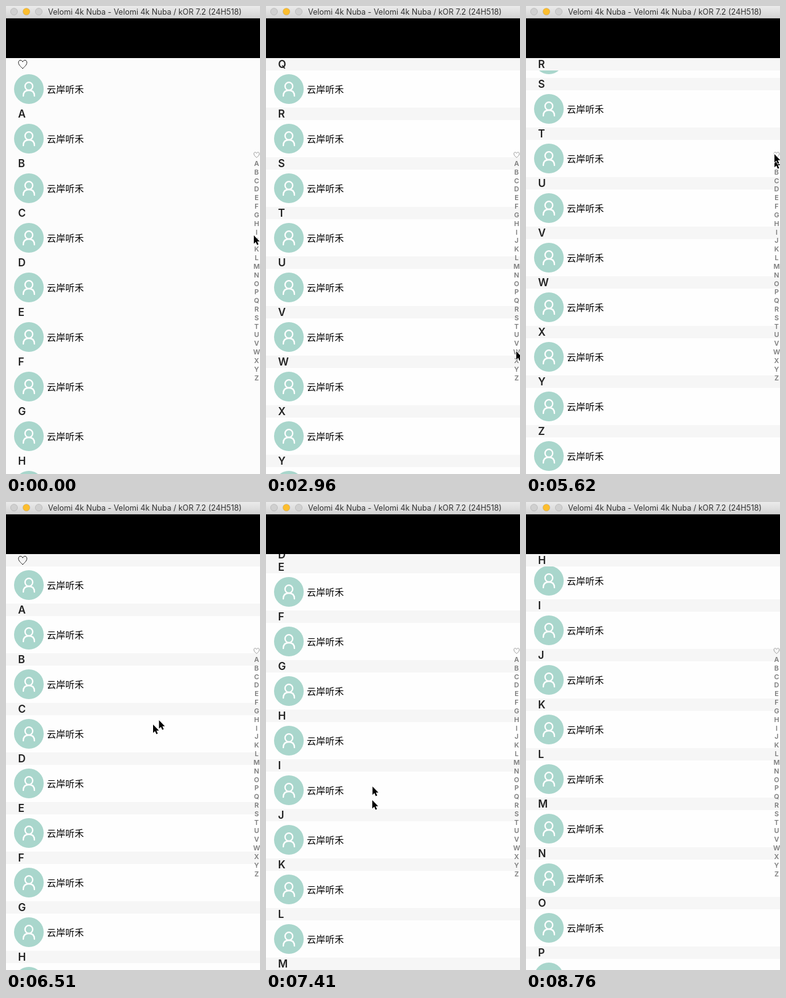
These frames come from a looping animation (411x755 px, 9510 ms). An HTML page:

```html
<!DOCTYPE html>
<html lang="en">
<head>
<meta charset="utf-8">
<title>Contact list</title>
<style>
  html, body { margin: 0; width: 100%; height: 100%; overflow: hidden; background: #fefefe; }
  svg { display: block; width: 411px; height: 755px; }
  text { font-family: Inter, Roboto, sans-serif; }
  .title { font-size: 12.5px; fill: #333; }
  .name { font: 15px "Noto Sans CJK SC", "Noto Sans CJK", sans-serif; fill: #000; }
  .letter { font-size: 17px; font-weight: 600; fill: #222; }
  .key { font-size: 11px; font-weight: 600; fill: #7c7c7c; text-anchor: middle; }
  .line { fill: none; }
</style>
</head>
<body>
<svg viewBox="0 0 411 755">
  <defs>
    <linearGradient id="chrome" x2="0" y2="1">
      <stop stop-color="#ebebeb"/><stop offset="1" stop-color="#d3d3d3"/>
    </linearGradient>
    <path id="heart" d="M0 7C-3 3.8-6.8 1-6.8-2.8C-6.8-7.4-1.4-7.8 0-3.8C1.4-7.8 6.8-7.4 6.8-2.8C6.8 1 3 3.8 0 7Z"/>
    <g id="row">
      <circle cx="37" cy="50" r="24" fill="#a9d6cc"/>
      <g class="line" stroke="#fff" stroke-width="2.3" stroke-linecap="round">
        <ellipse cx="37" cy="45.5" rx="6.2" ry="6.4"/>
        <path d="M28 61.2C28 55 31.4 52 37 52S46 55 46 61.2"/>
      </g>
      <text class="name" x="66" y="55.5">云岸听禾</text>
    </g>
    <path id="arrow" d="M0 0V13.4L3.1 10.6L5.3 15.5L7.6 14.5L5.4 9.7H9.5Z"
      fill="#000" stroke="#fff" stroke-width="1.8" paint-order="stroke"/>
  </defs>
  <rect id="page" width="411" height="755"/>
  <g id="rows"></g>
  <g id="headers"></g>
  <rect y="20" width="411" height="64"/>
  <rect width="411" height="20" fill="url(#chrome)"/>
  <rect y="19" width="411" height="1" fill="#bcbcbc"/>
  <g id="lights"></g>
  <text class="title" x="68" y="14">Velomi 4k Nuba - Velomi 4k Nuba / kOR 7.2 (24H518)</text>
  <g id="index"></g>
  <use id="ghost" href="#arrow"/>
  <use id="cursor" href="#arrow"/>
</svg>
<script>
const LOOP = 9510, STEP = 147.95, LAST_STEP = 59;
const TOP = 84, BOTTOM = 755, SECTION = 80, HEADER = 20, MAX_SCROLL = 1488;
const LETTERS = '♡ABCDEFGHIJKLMNOPQRSTUVWXYZ';
const $ = id => document.getElementById(id);

function add(parent, tag, attrs, text = '') {
  const el = document.createElementNS('http://www.w3.org/2000/svg', tag);
  for (const name in attrs) el.setAttribute(name, attrs[name]);
  el.textContent = text;
  return parent.appendChild(el);
}
const place = (el, x, y) => el.setAttribute('transform', `translate(${x} ${y})`);
const show = (el, on) => { el.style.display = on ? '' : 'none'; };

['#d0d0d0', '#fdbe2f', '#d0d0d0'].forEach((fill, i) => add($('lights'), 'circle',
  { cx: 13 + 20 * i, cy: 9, r: 5.6, fill, stroke: '#000', 'stroke-opacity': .12 }));

// All times below count picture steps.
const taps = [[1, 'I'], [12, 'Q'], [22, 'W'], [40, '♡']];
const flick = { start: 47, length: 6, distance: 647 };

function scrollAt(step) {
  if (step > flick.start) {
    const u = Math.min(1, (step - flick.start) / flick.length);
    return Math.round(flick.distance * (1 - (1 - u ** 1.835) ** 2.8));
  }
  const tap = taps.filter(([at]) => at <= step).pop();
  return tap ? Math.min(MAX_SCROLL, LETTERS.indexOf(tap[1]) * SECTION) : 0;
}

// Cursor stops as [step, x, y], linear in between
const stops = [
  [0, 401, 370], [3, 400, 366], [10, 403, 480], [14, 403, 480], [20, 405, 557],
  [25, 405, 599], [29.3, 405, 599], [37, 402, 239], [41, 407, 237],
  [44, 238, 359], [48, 176, 222], [50, 172, 481],
  [53, 163, 556], [55, 163, 556], [58, 149, 404]
];

function cursorAt(step) {
  const next = stops.find(stop => stop[0] > step) || stops[stops.length - 1];
  const last = stops[Math.max(0, stops.indexOf(next) - 1)];
  const u = Math.min(1, Math.max(0, (step - last[0]) / (next[0] - last[0])));
  return [1, 2].map(n => last[n] + (next[n] - last[n]) * u);
}

const sections = [...LETTERS].map((letter, i) => {
  const row = add($('rows'), 'use', { href: '#row' });
  const header = add($('headers'), 'g', {});
  const band = add(header, 'rect', { width: 411, height: HEADER });
  const keyY = 240.2 + i * 13.82;
  if (i === 0) {
    const heart = { href: '#heart', class: 'line' };
    add(header, 'use', { ...heart, stroke: '#222', transform: 'translate(27 10)' });
    add($('index'), 'use', { ...heart, stroke: '#8a8a8a', 'stroke-width': 1.3,
      transform: `translate(405.5 ${keyY}) scale(.65)` });
  } else {
    add(header, 'text', { class: 'letter', x: 19.5, y: 16 }, letter);
    add($('index'), 'text', { class: 'key', x: 405.5, y: keyY + 4 }, letter);
  }
  return { row, header, band };
});

function render(time) {
  const step = Math.min(LAST_STEP, Math.floor(time / STEP));
  const offset = scrollAt(step);
  const tinted = step > 0;
  $('page').setAttribute('fill', tinted ? '#fefefe' : '#fcfcfc');

  sections.forEach(({ row, header, band }, i) => {
    const y = TOP + i * SECTION - offset;
    const inView = y > TOP - SECTION && y < BOTTOM;
    show(row, inView);
    show(header, inView);
    place(row, 0, y);
    // Headers stick to the top until the next one pushes them out.
    place(header, 0, Math.max(y, Math.min(TOP, y + SECTION - HEADER)));
    band.setAttribute('fill', tinted ? '#f6f6f6' : '#fcfcfc');
  });

  // A fast cursor leaves a second image behind it.
  const now = cursorAt(step), before = cursorAt(step - .17);
  const visible = step < LAST_STEP;
  const fast = Math.hypot(now[0] - before[0], now[1] - before[1]) > 5;
  place($('cursor'), ...now);
  place($('ghost'), ...before);
  show($('cursor'), visible);
  show($('ghost'), visible && fast);
}

const start = performance.now();
function loop() {
  render((performance.now() - start) % LOOP);
  requestAnimationFrame(loop);
}
loop();
</script>
</body>
</html>
```
